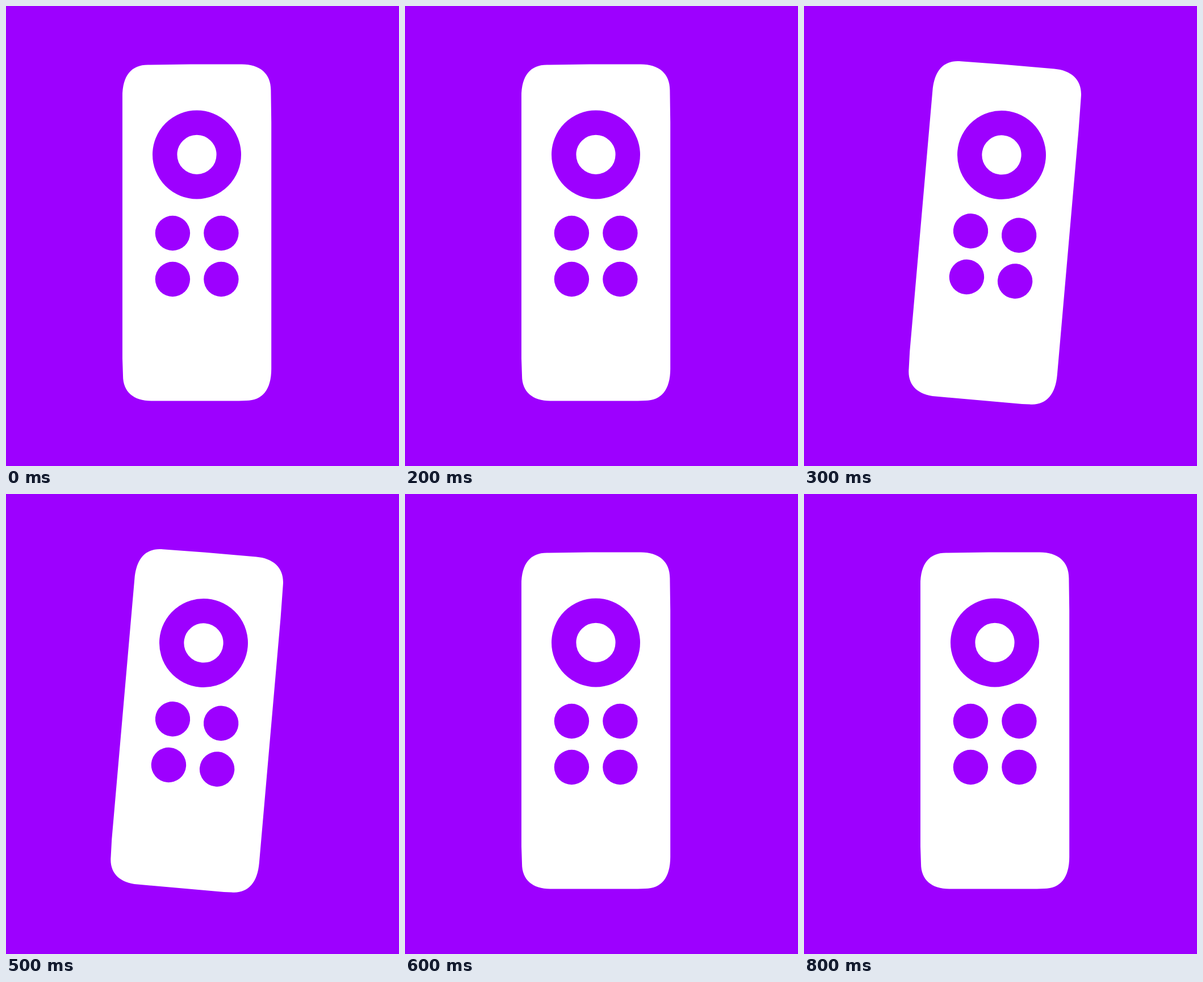
Animation of 692x809 px, one loop 2.8 s. Source, as an HTML page:

```html
<!DOCTYPE html>
<html lang="en">
<head>
<meta charset="utf-8">
<title>Remote</title>
<style>
  html, body { margin: 0; width: 100%; height: 100%; overflow: hidden; background: #9d00ff; }
  svg { display: block; }
</style>
</head>
<body>
<svg width="692" height="809" viewBox="0 0 692 809" fill="#9d00ff">
  <g id="remote">
    <path fill="#fff" d="M205 160 C205 122 221 103.6 250 103.6 L325 102.6 H415
      C447 102.6 466.4 119 466.4 148 L467.2 205 V638
      C467.2 675 451 694 423 694 L410 694.6 H257
      C225 694.6 206 679 206 650 L205 620 Z"/>
    <circle cx="336" cy="261.4" r="56.3" fill="none" stroke="#9d00ff" stroke-width="43.4"/>
    <circle cx="293.4" cy="399.5" r="30.7"/>
    <circle cx="378.9" cy="399.5" r="30.7"/>
    <circle cx="293.4" cy="480.5" r="30.7"/>
    <circle cx="378.9" cy="480.5" r="30.7"/>
  </g>
</svg>
<script>
const LOOP = 2800, STEP = 100, SHAKE_END = 800, TILT = 5;
const remote = document.getElementById('remote');

// The remote snaps between upright and tilted, then rests.
function draw() {
  const t = performance.now() % LOOP;
  const tilted = t < SHAKE_END && Math.floor(t / STEP) % 2 === 1;
  remote.setAttribute('transform', `rotate(${tilted ? TILT : 0} 336 398.7)`);
  requestAnimationFrame(draw);
}
draw();
</script>
</body>
</html>
```
